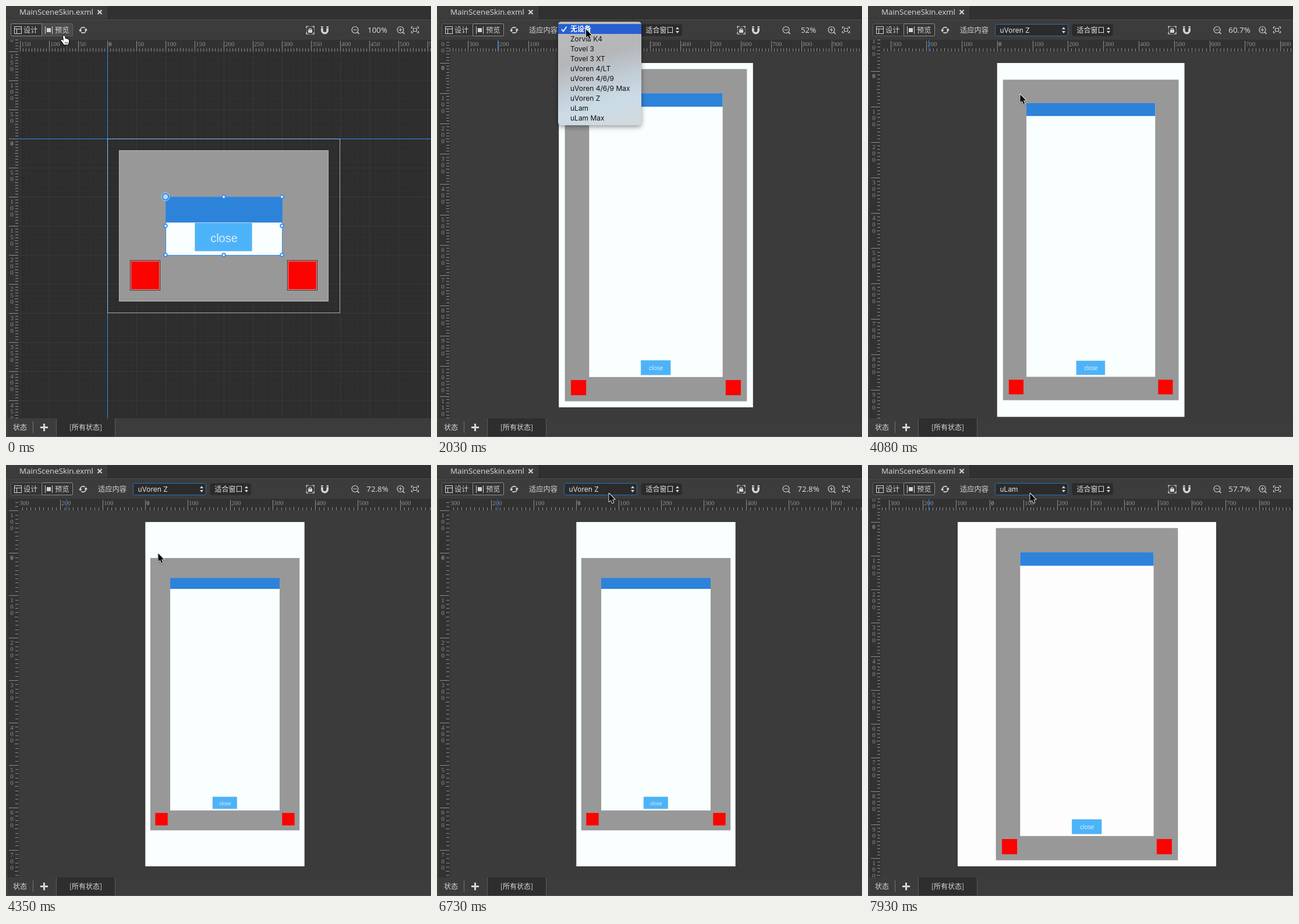
Recreate the animation shown at these times as an HTML page with a canvas. Size 730 by 741 pixels, loop 8 s.

```html
<!DOCTYPE html>
<html lang="zh">
<head>
<meta charset="utf-8">
<title>Preview modes</title>
<style>
html, body { margin: 0; width: 100%; height: 100%; overflow: hidden; background: #3c3c3c; }
canvas { display: block; width: 730px; height: 741px; }
</style>
</head>
<body>
<canvas id="stage" width="730" height="741"></canvas>
<script>
const c = document.getElementById('stage').getContext('2d');
const W = 730, H = 741, LOOP = 8000;
const UI = '"Noto Sans CJK SC", "Noto Sans CJK", "Noto Sans", sans-serif';
const LATIN = '"Open Sans", "Noto Sans", sans-serif';
const MENU = 'Inter, "Noto Sans CJK SC", "Noto Sans CJK", sans-serif';
const SERIF = '"Liberation Serif", serif';
const INK = '#d6d6d6';
const DEVICES = ['无设备', 'Zorvia K4', 'Tovel 3', 'Tovel 3 XT', 'uVoren 4/LT', 'uVoren 4/6/9',
  'uVoren 4/6/9 Max', 'uVoren Z', 'uLam', 'uLam Max'];

// A device is centred and fitted to 592 px; its 640 x 1136 content is fitted inside it.
function fitted(w, h, label) {
  const z = 592 / h;
  return [z, 376 - w * z / 2, 98, w, h, Math.min(w / 640, h / 1136), 640, 1136, label];
}
// Views: zoom, x, y, device w, h, content scale, content w, h, zoom label
const VIEWS = [
  [1, 174, 228, 400, 300, 1, 400, 300, 100],
  fitted(640, 1136, 52), fitted(375, 812, 72.8), fitted(768, 1024, 57.7)
];
// View changes: ease start, duration, times at which the picture steps
const CHANGES = [
  [480, 507, [500, 570, 650, 740, 830, 920]],
  [3970, 464, [4020, 4080, 4170, 4260, 4350]],
  [6860, 464, [6910, 6980, 7060, 7150, 7240]]
];
// Pointer moves: first step, last step, step count, end x, y
const MOVES = [
  [1540, 1850, 6, 256, 40],
  [2750, 3320, 11, 261.5, 152],
  [4740, 5190, 7, 295.5, 49],
  [7930, 7930, 1, 278.5, 49]
];
// Menus: open time, close start, close end, y of first row, checked row
const MENUS = [
  [2030, 3560, 3850, 31, 0],
  [5430, 6440, 6730, -88, 7]
];

const mix = (a, b, p) => a + (b - a) * p;
const clamp = v => Math.max(0, Math.min(1, v));
const easeOut = u => 1 - (1 - u) ** 2;
const easeBoth = u => (1 - Math.cos(Math.PI * u)) / 2;
const stepped = (t, a, b, n) =>
  t < a ? 0 : n < 2 ? 1 : Math.min(1, (Math.floor((t - a) / (b - a) * (n - 1) + 1e-6) + 1) / n);

function rect(x, y, w, h, fill) { c.fillStyle = fill; c.fillRect(x, y, w, h); }
function frame(x, y, w, h, color) {
  const l = Math.round(x), t = Math.round(y);
  c.strokeStyle = color; c.lineWidth = 1;
  c.strokeRect(l + .5, t + .5, Math.round(x + w) - l - 1, Math.round(y + h) - t - 1);
}
function round(x, y, w, h, r, fill, stroke) {
  c.beginPath(); c.roundRect(x, y, w, h, r);
  if (fill) { c.fillStyle = fill; c.fill(); }
  if (stroke) { c.strokeStyle = stroke; c.lineWidth = 1; c.stroke(); }
}
function path(pts, { fill, stroke, width = 1, close = !!fill }) {
  c.beginPath();
  for (let i = 0; i < pts.length; i += 2) c.lineTo(pts[i], pts[i + 1]);
  if (close) c.closePath();
  if (stroke) { c.strokeStyle = stroke; c.lineWidth = width; c.stroke(); }
  if (fill) { c.fillStyle = fill; c.fill(); }
}
function arc(x, y, r, a, b, color, width) {
  c.beginPath(); c.arc(x, y, r, a, b);
  c.strokeStyle = color; c.lineWidth = width; c.stroke();
}
function text(s, x, y, font, color, align = 'left') {
  c.font = font; c.fillStyle = color; c.textAlign = align; c.fillText(s, x, y);
}
function clipped(x, y, w, h, draw) {
  c.save(); c.beginPath(); c.rect(x, y, w, h); c.clip(); draw(); c.restore();
}

function viewAt(t) {
  let i = 0;
  while (i < 2 && t >= CHANGES[i + 1][2][0]) i++;
  const [start, span, times] = CHANGES[i];
  const now = Math.max(0, ...times.filter(s => s <= t));
  const ease = s => easeOut(clamp((s - start) / span));
  const p = now === 0 ? 0 : now === times[times.length - 1] ? 1 : ease(now);
  const from = VIEWS[i], to = VIEWS[i + 1];
  const make = q => {
    const [z, x, y, w, h, s, cw, ch, label] = from.map((v, k) => mix(v, to[k], q));
    return { z, x, y, w, h, s, cw, ch, label, ox: (w - cw * s) / 2, oy: (h - ch * s) / 2 };
  };
  const view = make(p), a = make(0), b = make(1), q = p ** 1.5;
  view.rx = view.x + mix(a.ox * a.z, b.ox * b.z, q);
  view.ry = view.y + mix(a.oy * a.z, b.oy * b.z, q);
  view.mode = i ? 1 : p;
  if (!i && p > 0 && p < 1) {
    const late = make(ease(now - 35));
    view.ghost = { ...view, cw: late.cw, ch: late.ch };
  }
  return view;
}

function place(v, l, t, r, b) {
  const k = v.z * v.s;
  return [v.x + v.ox * v.z + l * k, v.y + v.oy * v.z + t * k, (r - l) * k, (b - t) * k];
}
function parts(v) {
  const { cw, ch } = v, at = (...e) => place(v, ...e);
  return {
    back: at(20, 20, cw - 20, ch - 20),
    panel: at(100, 100, cw - 100, ch - 100),
    header: at(100, 100, cw - 100, 144.3),
    close: at(cw / 2 - 49.5, ch - 155, cw / 2 + 48.5, ch - 107),
    left: at(40, ch - 90, 90, ch - 40),
    right: at(cw - 90, ch - 90, cw - 40, ch - 40)
  };
}

function grid() {
  for (const [gap, color] of [[10, '#313131'], [50, '#393939']]) {
    for (let x = 24; x < W; x += gap) rect(x, 78, 1, 631, color);
    for (let y = 78; y < 709; y += gap) rect(22, y, 708, 1, color);
  }
}

function selection([x, y, w, h]) {
  const blue = '#2f8cf5';
  frame(x, y, w + 1, h + 1, blue);
  for (const i of [0, .5, 1]) for (const j of [0, .5, 1]) {
    if (i === .5 && j === .5) continue;
    const first = !i && !j, px = x + w * i, py = y + h * j;
    if (first) path([px + 4, py - 5, px + 10, py, px + 4, py + 5], { fill: blue });
    c.beginPath(); c.arc(px, py, first ? 5.5 : 2.8, 0, 7);
    c.fillStyle = first ? '#b9d9f8' : '#eaf4fd'; c.fill();
    c.strokeStyle = blue; c.lineWidth = first ? 2.6 : 1.8; c.stroke();
    if (first) arc(px, py, 7, 0, 7, '#d5e6f5', .8);
  }
}

function scene(v, t) {
  const design = t < 500, shade = Math.round(mix(45, 59, v.mode));
  rect(22, 78, 708, 631, `rgb(${shade},${shade},${shade})`);
  if (design) grid();
  else if (v.mode < 1) {
    const faint = `rgba(255,255,255,${.3 * (1 - v.mode)})`;
    rect(Math.round(v.x), 78, 1, 631, faint);
    rect(22, Math.round(v.y), 708, 1, faint);
  }
  const white = t < 6910 ? '#f9fefe' : '#fdfdfe';
  if (!design) {
    c.globalAlpha = v.mode;
    rect(v.x, v.y, v.w * v.z, v.h * v.z, white);
    c.globalAlpha = 1;
  }
  const b = parts(v), k = v.z * v.s;
  rect(...b.back, '#989898');
  rect(...b.panel, white);
  rect(...b.header, '#2d82da');
  const [x, y, w, h] = b.close;
  rect(x, y + k, w, h, 'rgba(60,100,140,.3)');
  rect(x, y, w, h, '#4db3f8');
  text('close', x + w / 2 + k, y + h / 2 + 9 * k, `${20 * k}px "Liberation Sans", sans-serif`,
    'rgba(255,255,255,.78)', 'center');
  rect(...b.left, '#fb0400');
  rect(...b.right, '#fb0400');
  if (design) {
    frame(174, 228, 400, 300, '#a5a5a5');
    frame(...b.back, '#b9b9b9');
    for (const [x, y, w, h] of [b.left, b.right]) {
      frame(x - 1, y - 1, w + 2, h + 2, '#3a2020');
      frame(x, y, w, h, '#f0a8a5');
    }
    rect(174, 78, 1, 631, '#2f8cf5');
    rect(22, 228, 708, 1, '#2f8cf5');
    rect(174, 228, 400, 1, '#8cbef0');
    rect(174, 228, 1, 300, '#8cbef0');
    selection(b.panel);
  } else if (v.ghost) {
    const g = parts(v.ghost), dark = `rgba(0,0,0,${1 - v.mode})`;
    for (const e of [g.back, g.panel, g.left, g.right]) frame(...e, dark);
  }
}

function rulers(v) {
  const unit = v.z > .8 ? 5 : 10, step = unit * v.z;
  const color = '#8f8f8f';
  rect(2, 58, 728, 20, '#323232');
  rect(2, 78, 20, 631, '#323232');
  const font = n => `${n ? '' : 'bold '}11px ${SERIF}`;
  const length = (i, full) => i % 10 === 0 ? full : i % 5 === 0 ? 6 : 5;
  clipped(22, 58, 708, 20, () => {
    for (let i = Math.floor((-10 - v.rx) / step); v.rx + i * step < W; i++) {
      const x = Math.round(v.rx + i * step), len = length(i, 18);
      rect(x, 78 - len, 1, len, color);
      if (i % 10 === 0) text(Math.abs(i * unit), x + 2, 69, font(i), color);
    }
    rect(104, 58, 1, 20, '#1f73d8');
  });
  clipped(2, 58, 20, 651, () => {
    for (let i = Math.floor((20 - v.ry) / step); v.ry + i * step < 709; i++) {
      const y = Math.round(v.ry + i * step), len = length(i, 16);
      rect(21 - len, y, len, 1, color);
      if (i % 10 === 0) [...String(Math.abs(i * unit))].forEach((d, n) =>
        text(d, 10, y + 11.5 + n * 11, font(i), color, 'center'));
    }
  });
}

function select(x, w, label, focus) {
  round(x + .5, 31.5, w - 1, 20, 3, '#2b2b2b', focus ? '#2a6fb8' : '#303030');
  const a = x + w - 8;
  path([a - 3, 40, a, 36, a + 3, 40], { fill: INK });
  path([a - 3, 43, a, 47, a + 3, 43], { fill: INK });
  text(label, x + 8.5, 46, `12px ${MENU}`, '#e4e4e4');
}

function magnifier(x, plus) {
  arc(x, 41, 5.5, 0, 7, INK, 1.2);
  path([x + 4, 45, x + 7, 48], { stroke: INK, width: 1.6 });
  rect(x - 3, 40.5, 6, 1, INK);
  if (plus) rect(x - .5, 38, 1, 6, INK);
}

function corners(x, y, w, h, n) {
  for (const [px, sx] of [[x, 1], [x + w, -1]]) for (const [py, sy] of [[y, 1], [y + h, -1]])
    path([px, py + n * sy, px, py, px + n * sx, py], { stroke: INK, width: 1.2 });
}

function toolbar(v, t) {
  const preview = t >= 500;
  rect(0, 0, W, 58, '#3c3c3c');
  rect(176, 0, 554, 22, '#313131');
  rect(175, 0, 1, 22, '#262626');
  rect(0, 22, W, 1, '#2c2c2c');
  rect(0, 23, W, 1, '#505050');
  text('MainSceneSkin.exml', 23, 15, `13.3px ${LATIN}`, '#dcdcdc');
  path([157.5, 7, 164.5, 14], { stroke: INK, width: 2 });
  path([164.5, 7, 157.5, 14], { stroke: INK, width: 2 });

  round(8.5, 30.5, 106, 21, 2, '#333', '#5c5c5c');
  if (preview) round(61.5, 30.5, 53, 21, 2, '#343434', '#8e8e8e');
  else {
    round(61.5, 30.5, 53, 21, 2, '#4a4a4a', '#626262');
    round(8.5, 30.5, 53, 21, 2, '#323232', '#8e8e8e');
  }
  frame(14, 35, 13, 13, INK);
  rect(14, 39, 13, 1, INK);
  rect(18, 39, 1, 9, INK);
  text('设计', 30, 46, `12.25px ${UI}`, INK);
  rect(67, 35, 1, 13, INK);
  rect(79, 35, 1, 13, INK);
  rect(70, 38, 7, 7, INK);
  text('预览', 84, 46, `12.25px ${UI}`, INK);

  arc(132.5, 41.5, 4.8, Math.PI, 5.4, INK, 1.8);
  arc(132.5, 41.5, 4.8, 0, 2.26, INK, 1.8);
  path([125, 41, 130.5, 41, 127.7, 45], { fill: INK });
  path([134.5, 42, 140, 42, 137.3, 38], { fill: INK });

  if (preview) {
    text('适应内容', 158, 46, `12.25px ${UI}`, INK);
    select(218, 126, DEVICES[t < 4020 ? 0 : t < 6910 ? 7 : 8], t >= 2030);
    select(350, 71, '适合窗口', false);
  }

  corners(516, 35, 13, 13, 3);
  c.setLineDash([1, 1.5]); frame(516, 35, 14, 14, INK); c.setLineDash([]);
  rect(519, 41, 7, 5, INK);
  arc(522.5, 41, 2.2, Math.PI, 0, INK, 1.2);
  c.beginPath(); c.moveTo(542.8, 35); c.lineTo(542.8, 42);
  c.arc(547.5, 42, 4.7, Math.PI, 0, true); c.lineTo(552.2, 35);
  c.strokeStyle = INK; c.lineWidth = 3.6; c.stroke();
  rect(541, 37, 4, 1, '#3c3c3c');
  rect(550, 37, 4, 1, '#3c3c3c');
  magnifier(599.5, false);
  text(+v.label.toFixed(1) + '%', 638, 46, `13.3px ${LATIN}`, '#e2e2e2', 'center');
  magnifier(677.5, true);
  corners(696.5, 36, 12, 10, 3);
  frame(699, 38, 7, 6, INK);
}

function statusBar() {
  rect(0, 709, W, 32, '#3c3c3c');
  rect(86, 709, 102, 32, '#5c5c5c');
  rect(87, 709, 100, 31, '#2e2e2e');
  text('状态', 12, 729, `12px ${UI}`, INK);
  rect(46, 714, 1, 20, '#747474');
  rect(59, 723, 13, 3, INK);
  rect(64, 718, 3, 13, INK);
  text('[所有状态]', 137, 729, `12px ${UI}`, INK, 'center');
  rect(0, 740, W, 1, '#545454');
  rect(0, 24, 1, 717, '#303030');
  rect(1, 24, 1, 717, '#505050');
}

function menu([open, fade, end, top, checked], index, t, y) {
  if (t < open || t >= end) return;
  const k = Math.round(stepped(t, fade, end, 6) * 6);
  c.globalAlpha = [1, 1, 1, .8, .5, .22][k];
  const my = top - 4, mh = 178;
  let fill = '#adadad';
  if (!index) {
    fill = c.createLinearGradient(235, my, 285, my + mh);
    [[0, '#bcbcbc'], [.35, '#b4b6b8'], [.6, '#c1cbd3'], [.8, '#cadbe6'], [1, '#d0dae0']]
      .forEach(s => fill.addColorStop(...s));
  }
  c.save();
  c.shadowColor = 'rgba(0,0,0,.4)'; c.shadowBlur = 8; c.shadowOffsetY = 3;
  round(208, my, 143, mh, 5, fill);
  c.restore();
  let hot = Math.floor((y - top) / 17);
  if (index && t < 5480) hot = checked;
  if (k === 1) hot = -1;
  if (hot >= 0) rect(208, top + hot * 17, 143, 17, '#2660d0');
  DEVICES.forEach((name, i) => {
    const color = i === hot ? '#fff' : '#111', row = top + i * 17;
    text(name, 229, row + 13, `${i ? '' : 'bold '}12px ${MENU}`, color);
    if (i === checked) path([214, row + 9, 217, row + 12.5, 222.5, row + 4.5], { stroke: color, width: 1.8 });
  });
  c.globalAlpha = 1;
}

function pointerAt(t) {
  let x = 100, y = 51;
  for (const [a, b, n, ex, ey] of MOVES) {
    const p = easeBoth(stepped(t, a, b, n));
    x = mix(x, ex, p); y = mix(y, ey, p);
  }
  return [x, y];
}

function pointer(x, y) {
  c.save();
  c.translate(x, y);
  c.lineJoin = 'round';
  c.shadowColor = 'rgba(0,0,0,.35)'; c.shadowBlur = 2; c.shadowOffsetY = 1;
  if (x < 115) {
    path([-2, 1, -.5, 0, 1, 1, 2, 5.5, 4, 5, 5, 6, 6.5, 6, 7, 7, 8, 7.5, 8, 11, 6.5, 15.5,
      -.5, 15.5, -2.5, 12, -5.5, 8.5, -5, 7, -3.5, 7, -1, 9],
      { fill: '#fff', stroke: '#111', width: 1.8 });
    c.shadowColor = 'transparent';
    for (const fx of [1, 3, 5]) rect(fx, 10.5, .8, 3.5, '#333');
  } else {
    path([0, 0, 0, 14, 3.2, 11, 5.6, 16.5, 7.8, 15.5, 5.5, 10.2, 9.8, 10.2],
      { fill: '#0a0a0a', stroke: '#fff', width: 2 });
  }
  c.restore();
}

function draw(t) {
  const v = viewAt(t), [px, py] = pointerAt(t);
  clipped(22, 78, 708, 631, () => scene(v, t));
  toolbar(v, t);
  rulers(v);
  statusBar();
  MENUS.forEach((m, i) => menu(m, i, t, py));
  pointer(px, py);
}

const begin = performance.now();
function tick() {
  draw((performance.now() - begin) % LOOP);
  requestAnimationFrame(tick);
}
tick();
</script>
</body>
</html>
```
